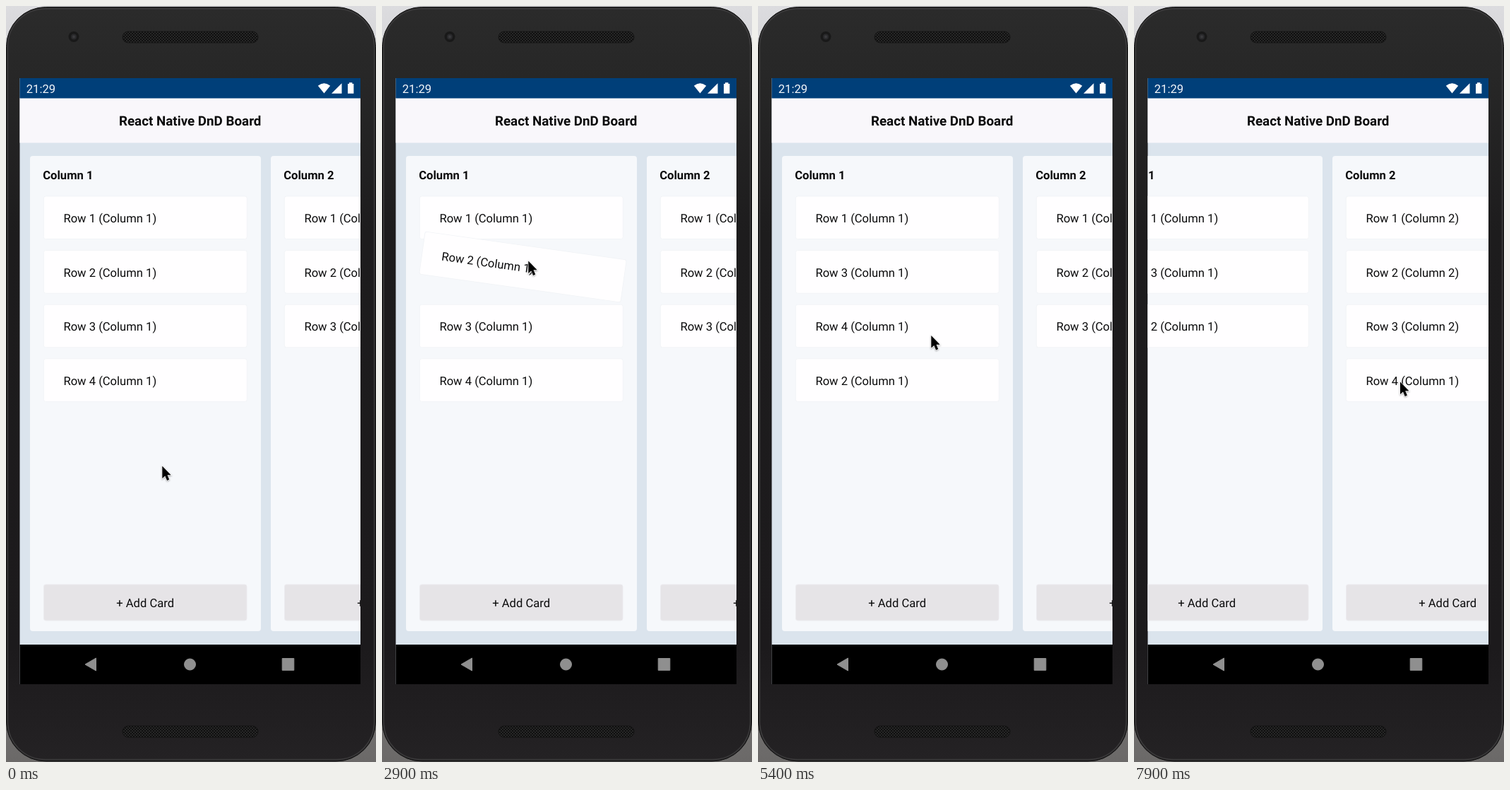
Recreate the animation shown at these times as an HTML page. Size 524 by 1069 pixels, loop 8 s.

```html
<!DOCTYPE html>
<html lang="en">
<head>
<meta charset="utf-8">
<title>Drag and drop board</title>
<style>
  html, body { margin: 0; width: 100%; height: 100%; overflow: hidden; background: #1f1e1f; }
  svg { display: block; width: 100vw; height: 100vh; }
  text { font: 16.6px Roboto, "Liberation Sans", sans-serif; fill: #0b0b0c; text-rendering: geometricPrecision; white-space: pre; }
  .bold { font-weight: 700; }
  .head { font-size: 18.8px; }
  .mid { text-anchor: middle; }
  .card rect { fill: #fffeff; stroke: #f2f4f7; }
  .lane { fill: #f6f8fb; }
  .btn { fill: #e6e4e7; stroke: #ecebef; }
  #cursor { filter: drop-shadow(0 1.5px 1.2px rgba(0, 0, 0, .35)); }
</style>
</head>
<body>
<svg viewBox="0 0 524 1069" preserveAspectRatio="none">
  <defs>
    <linearGradient id="desk" x2="0" y2="1">
      <stop offset="0" stop-color="#dcdcdf"/><stop offset="1" stop-color="#6b6968"/>
    </linearGradient>
    <linearGradient id="shell" x2="0" y2="1">
      <stop offset="0" stop-color="#2b2b2b"/><stop offset=".09" stop-color="#272727"/>
      <stop offset=".3" stop-color="#1d1c1d"/><stop offset=".85" stop-color="#1c1a1c"/>
      <stop offset="1" stop-color="#242224"/>
    </linearGradient>
    <pattern id="mesh" width="4" height="4" patternUnits="userSpaceOnUse">
      <rect width="4" height="4" fill="#272727"/>
      <circle cx="1" cy="1" r="1.05" fill="#0b0b0b"/><circle cx="3" cy="3" r="1.05" fill="#0b0b0b"/>
    </pattern>
    <clipPath id="screen"><rect x="19.5" y="102" width="482.5" height="857"/></clipPath>
  </defs>

  <rect width="524" height="1069" fill="url(#desk)"/>
  <rect x=".5" y="1.5" width="523" height="1066.5" rx="56" fill="url(#shell)" stroke="#111"/>
  <rect x="2.5" y="4" width="519" height="1061.5" rx="53" fill="none" stroke="#3b3a3b" stroke-width="1.5"/>
  <circle cx="96" cy="43.5" r="7.5" fill="#191919"/>
  <circle cx="96" cy="43.5" r="4" fill="#2a2a2c"/>
  <circle cx="96" cy="43.5" r="2" fill="#3a3a3d"/>
  <rect x="165" y="36" width="192" height="16" rx="8" fill="url(#mesh)" stroke="#161616"/>
  <rect x="165" y="1018" width="192" height="16" rx="8" fill="url(#mesh)" stroke="#131313"/>

  <g clip-path="url(#screen)">
    <rect x="19" y="102" width="484" height="858" fill="#dbe4ed"/>
    <g id="board"></g>
    <rect x="19" y="130" width="484" height="63.5" fill="#f9f7fb"/>
    <text class="bold head mid" x="260.7" y="169.4">React Native DnD Board</text>
    <rect x="19" y="102" width="484" height="28.5" fill="#003f79"/>
    <text x="28.8" y="123.3" style="fill:#f2f5f9">21:29</text>
    <g fill="#fff">
      <path d="M441.8 112.8Q450.5 105.6 459.2 112.8L450.5 123.6Z"/>
      <path d="M461 123.7H475.5V109.2Z"/>
      <path d="M486 108.3h4.4v1.6h2v13.8h-8.4v-13.8h2z"/>
    </g>
    <g id="hover" class="card"></g>
    <rect x="19" y="903" width="484" height="57" fill="#000"/>
    <g fill="#8f8f8f" stroke="#8f8f8f" stroke-linejoin="round">
      <path d="M112 931L127.5 922V940Z"/>
      <circle cx="260.5" cy="931" r="8"/>
      <rect x="391.2" y="922.5" width="16.6" height="16.8"/>
    </g>
  </g>

  <g id="cursor">
    <path d="M0 0V17.6L4 13.9 6.8 20.4 9.9 19 7.2 12.8H12.4Z" fill="#000" stroke="#fff" stroke-width="1.3" paint-order="stroke"/>
  </g>
</svg>
<script>
const LOOP = 8000, STEP = 100;
const COL = 341, MID_X = 197.3, MID_Y = 299.3, PITCH = 76.6;
const $ = id => document.getElementById(id);
const board = $('board'), hover = $('hover'), cursor = $('cursor');

const cardBody = label =>
  `<rect x="-144" y="-30.3" width="288" height="60.6" rx="3"/><text x="-115.9" y="6.6">${label}</text>`;

function addGroup(html, cls) {
  const g = document.createElementNS('http://www.w3.org/2000/svg', 'g');
  if (cls) g.setAttribute('class', cls);
  g.innerHTML = html;
  return board.appendChild(g);
}

function place(el, x, y, angle = 0) {
  el.setAttribute('transform', `translate(${x} ${y}) rotate(${angle})`);
}

// Keys are [time, ...values]; values are interpolated and held at both ends.
function at(keys, t) {
  const i = keys.findIndex(k => k[0] > t);
  if (i < 0) return keys[keys.length - 1].slice(1);
  if (i === 0) return keys[0].slice(1);
  const a = keys[i - 1], b = keys[i], p = (t - a[0]) / (b[0] - a[0]);
  return a.slice(1).map((v, n) => v + (b[n + 1] - v) * p);
}

for (const c of [0, 1]) {
  place(addGroup(`<rect class="lane" x="34" y="212" width="327" height="672" rx="4"/>
    <text class="bold" x="52.2" y="244.8">Column ${c + 1}</text>
    <rect class="btn" x="53.5" y="818" width="287.5" height="51" rx="3"/>
    <text class="mid" x="197.2" y="849.8">+ Add Card</text>`), c * COL, 0);
}

const rows = [
  { n: 1, slots: [[2100, 0], [2300, 1], [2600, 1], [2800, 0]] },
  { n: 2, slots: [[4700, 1], [4800, 3], [6000, 3], [6200, 2]] },
  { n: 3, slots: [[3400, 2], [3600, 1]] },
  { n: 4, slots: [[4400, 3], [4600, 2], [6600, 2], [6700, 3]] },
  ...[1, 2, 3].map(n => ({ n, col: 1, slots: [[0, n - 1]] }))
];
for (const r of rows) {
  r.col = r.col || 0;
  r.label = `Row ${r.n} (Column ${r.col + 1})`;
  r.el = addGroup(cardBody(r.label), 'card');
}

// Each drag: centre x, centre y and tilt of the lifted card.
const drags = [
  { row: rows[1], from: 1200, to: 4900, endCol: 0, keys: [
    [1300, 197.3, 376, 8], [1400, 198, 372, 8], [2000, 198.5, 309.5, 8], [2300, 198, 276, 8],
    [2500, 198, 273, 8], [2900, 199.5, 369, 8], [3100, 199.5, 382, 8], [3700, 207.2, 518, 8],
    [4000, 207.2, 522, 8], [4200, 208, 528, 8], [4300, 208, 528, 8], [4600, 210, 567, 8],
    [4700, 210, 567, 8], [4900, MID_X, 529.1, 0]] },
  { row: rows[3], from: 5600, to: 7000, endCol: 1, keys: [
    [5700, 197.3, 452.5, 8], [5900, 260, 505, 8], [6100, 370, 562, 8], [6200, 418, 568, 8],
    [6500, 415, 566, 8], [6600, 406, 564.5, 8], [6800, 376, 548, 8], [7000, 444.3, 529.1, 0]] }
];

const pointer = [
  [0, 221.3, 650.5], [100, 219, 600], [200, 213, 490], [300, 208, 405], [400, 206.5, 381],
  [1300, 206.5, 381], [2000, 206.5, 289.5], [2300, 206, 262], [2500, 206, 266], [2900, 207.3, 360.5],
  [3100, 207.5, 374], [3700, 215.3, 511], [4000, 215.5, 515], [4200, 216, 521], [4300, 216, 521],
  [4600, 218, 562], [4700, 219, 560], [5000, 245.3, 466], [5700, 245.3, 466], [5900, 320, 530],
  [6100, 430, 586], [6200, 462, 587], [6300, 462, 587], [6500, 430, 587], [6600, 389.8, 592],
  [6800, 378, 562], [7200, 377, 531.5]
];
const scroll = [[6300, 0], [6400, -32], [6500, -70], [6600, -94]];

function draw(t) {
  place(board, at(scroll, t)[0], 0);
  const drag = drags.find(d => t >= d.from && t < d.to);
  for (const r of rows) {
    const move = drags.find(d => d.row === r && t >= d.to);
    const col = move ? move.endCol : r.col;
    place(r.el, MID_X + col * COL, MID_Y + at(r.slots, t)[0] * PITCH);
    r.el.style.display = drag && drag.row === r ? 'none' : '';
  }
  hover.style.display = drag ? '' : 'none';
  if (drag) {
    if (hover.dataset.label !== drag.row.label) {
      hover.dataset.label = drag.row.label;
      hover.innerHTML = cardBody(drag.row.label);
    }
    place(hover, ...at(drag.keys, t));
  }
  place(cursor, ...at(pointer, t));
}

function tick() {
  const t = performance.now() % LOOP;
  draw(Math.floor(t / STEP) * STEP);
  requestAnimationFrame(tick);
}
tick();
</script>
</body>
</html>
```
